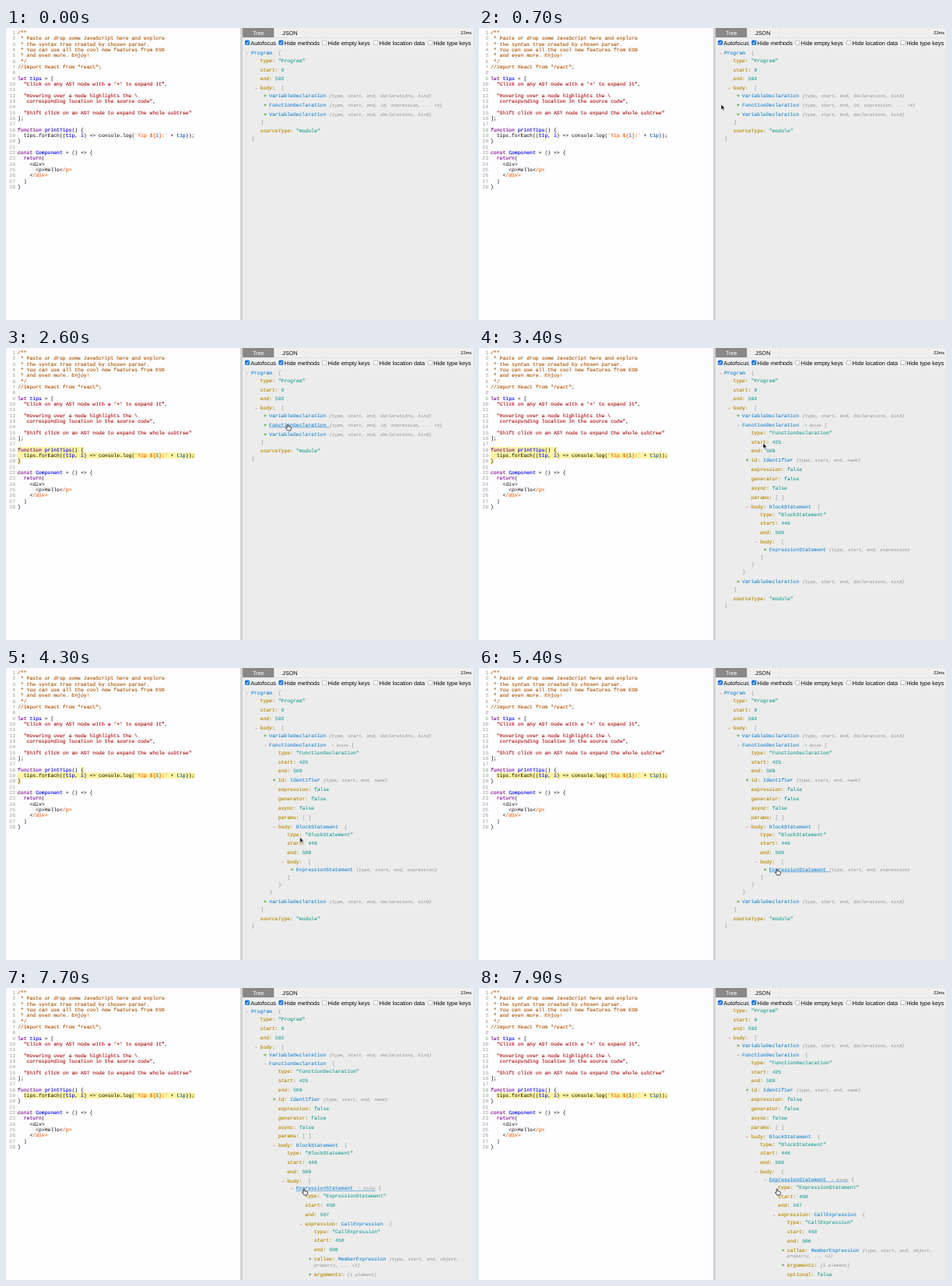
Animation, 600 px wide and 375 px high, one loop 8 s. Source, as an HTML page:

```html
<!DOCTYPE html>
<html lang="en">
<head>
<meta charset="utf-8">
<title>Syntax tree explorer</title>
<style>
html, body { margin: 0; width: 100%; height: 100%; overflow: hidden; background: #fefdff; }
svg { display: block; width: 600px; height: 375px; }
text { white-space: pre; text-rendering: geometricPrecision; stroke: none; }
.mono text { font: 6.43px "Liberation Mono", "Courier New", monospace; }
.ui text { font: 7.33px "Liberation Sans", Arial, sans-serif; }
#code text, #tree text { stroke-width: .12px; }
.num { fill: #999; text-anchor: end; }
.c { fill: #a50; stroke: #a50; } .s { fill: #a11; stroke: #a11; }
.k { fill: #708; stroke: #708; } .d { fill: #00f; stroke: #00f; }
.v { fill: #05a; stroke: #05a; } .t { fill: #f50; stroke: #f50; }
.key { fill: #b58900; stroke: #b58900; } .val { fill: #2aa198; stroke: #2aa198; }
.name { fill: #268bd2; stroke: #268bd2; } .p { fill: #8a9393; }
.hint { fill: #8f8f8f; font-size: .9em; font-style: italic; }
.ref { fill: #8f9799; font-size: .8em; font-style: italic; }
.plus { fill: #3a9a2a; stroke: #3a9a2a; } .minus { fill: #e0322f; stroke: #e0322f; }
</style>
</head>
<body>
<script type="text/plain" id="source">«c/**»
«c * Paste or drop some JavaScript here and explore»
«c * the syntax tree created by chosen parser.»
«c * You can use all the cool new features from ES6»
«c * and even more. Enjoy!»
«c */»
«c//import React from "react";»

«klet» «dtips» = [
  «s"Click on any AST node with a '+' to expand it"»,

  «s"Hovering over a node highlights the \»
«s   corresponding location in the source code"»,

  «s"Shift click on an AST node to expand the whole subtree"»
];

«kfunction» «dprintTips»() {
  tips.forEach((«dtip», «di») => console.log(«t`Tip ${»«vi»«t}:`» + «vtip»));
}

«kconst» «dComponent» = () => {
  «kreturn»(
    <div>
      <p>Hello<«t/p>»
    <«t/div>»
  )
}</script>
<svg viewBox="0 0 600 375">
  <rect width="600" height="375" fill="#fefdff"/>
  <g id="marks" fill="#fdf4a3"></g>
  <g id="code" class="mono"></g>
  <rect x="301" width="299" height="375" fill="#ececec"/>
  <g id="tree" class="mono"></g>
  <g id="header" class="ui"></g>
  <rect x="301" width="3" height="375" fill="#d2d2d2"/>
  <g id="cursor" stroke-linejoin="round">
    <path id="arrow" d="M0 0V7.2L1.7 5.7L2.9 8.4L4.1 7.9L2.9 5.3H5.2Z" fill="#111" stroke="#fff" stroke-width=".6"/>
    <path id="hand" d="M-.9 .6Q0 -.6 .8 .6V3Q1.7 2.4 2.2 3.2Q3.1 2.8 3.5 3.6Q4.5 3.4 4.5 4.5Q4.5 6.6 3.6 8H-.1Q-1.1 6.6 -2.5 4.8Q-2 3.7 -.9 4.7Z" fill="#fff" stroke="#111" stroke-width=".8"/>
  </g>
</svg>
<script>
const LOOP = 8000, CHAR = 3.858, LINE = 7.333, LEFT = 15;
const OPEN_FUNCTION = 2800, OPEN_STATEMENT = 7200, SCROLL_START = 7600, SCROLL_END = 7900;
const $ = id => document.getElementById(id);
const esc = s => s.replace(/&/g, '&amp;').replace(/</g, '&lt;');
const span = (cls, s) => `<tspan class="${cls}">${esc(s)}</tspan>`;
const text = (x, y, body, attrs = '') => `<text x="${x}" y="${y}" ${attrs}>${body}</text>`;
const rect = (x, y, w, h, fill, attrs = '') =>
  `<rect x="${x}" y="${y}" width="${w}" height="${h}" fill="${fill}" ${attrs}/>`;

// Editor
const lines = $('source').textContent.split('\n');
const lengths = lines.map(s => s.replace(/«.|»/g, '').length);
$('code').innerHTML = lines.map((s, i) => {
  const y = 8 + i * LINE;
  const body = esc(s).replace(/«(.)(.*?)»/g, '<tspan class="$1">$2</tspan>');
  return text(12, y, i + 1, 'class="num"') + text(LEFT, y, body, 'stroke="#000"');
}).join('');

function drawMarks(range) {
  if (!range) return '';
  const [from, startCol, to, endCol] = range;
  let out = '';
  for (let n = from; n <= to; n++) {
    const a = n === from ? startCol : 0;
    const b = n === to && endCol ? endCol : lengths[n - 1];
    out += rect(LEFT + a * CHAR, 2.4 + (n - 1) * LINE, (b - a) * CHAR, LINE + .1, '#fdf4a3');
  }
  return out;
}

// Panel header
const tab = (x, label, fill, color) =>
  rect(x, 0, 40.5, 12, fill) + text(x + 20.3, 8.6, label, `fill="${color}" text-anchor="middle"`);
const option = (x, label, on) =>
  (on ? rect(x, 15.8, 6, 6, '#1070e0', 'rx="1.2"') +
        `<path d="M${x + 1.4} 19l1.2 1.4l2-3.2" fill="none" stroke="#fff" stroke-width=".9"/>`
      : rect(x + .2, 16, 5.6, 5.6, '#fff', 'rx="1.1" stroke="#858585" stroke-width=".5"')) +
  text(x + 7.3, 21.6, label);
$('header').innerHTML =
  rect(304, 0, 296, 26, '#efefef') +
  tab(304, 'Tree', '#888', '#fff') + tab(344.5, 'JSON', '#efefef', '#111') +
  rect(385, 0, .5, 12, '#ddd') + rect(304, 12, 296, .6, '#dcdcdc') +
  text(598, 8, '22ms', 'text-anchor="end" style="font-size:5.6px"') +
  option(307, 'Autofocus', true) + option(350.3, 'Hide methods', true) +
  option(406.3, 'Hide empty keys') + option(472.2, 'Hide location data') +
  option(542, 'Hide type keys');

// Tree model
const prop = (key, val) => ({ key, val });
const base = (type, start, end) => [prop('type', `"${type}"`), prop('start', start), prop('end', end)];
const node = (key, name, range, hint, kids, ref) => ({ key, name, range, hint, kids, ref, brackets: '{}' });
const list = (key, kids, hint) => ({ key, kids, hint, brackets: '[]' });

function buildTree(functionOpen, statementOpen) {
  const declHint = '{type, start, end, declarations, kind}';
  const call = () => node('expression', 'CallExpression', [19, 2, 19, 59], '', [
    ...base('CallExpression', 450, 506),
    node('callee', 'MemberExpression', [19, 2, 19, 14], '{type, start, end, object,\nproperty, ... +2}'),
    list('arguments', null, '[1 element]'),
    prop('optional', 'false')
  ]);
  const statement = node('', 'ExpressionStatement', [19, 2, 19, 0], '{type, start, end, expression}',
    statementOpen && [...base('ExpressionStatement', 450, 507), call()], statementOpen);
  const func = node('', 'FunctionDeclaration', [18, 0, 20, 0], '{type, start, end, id, expression, ... +4}',
    functionOpen && [
      ...base('FunctionDeclaration', 425, 509),
      node('id', 'Identifier', [18, 9, 18, 18], '{type, start, end, name}'),
      prop('expression', 'false'), prop('generator', 'false'), prop('async', 'false'),
      { key: 'params', empty: '[ ]' },
      node('body', 'BlockStatement', [18, 21, 20, 0], '', [
        ...base('BlockStatement', 446, 509), list('body', [statement])
      ])
    ], functionOpen && !statementOpen);
  return node('', 'Program', [1, 0, 28, 0], '', [
    ...base('Program', 0, 592),
    list('body', [
      node('', 'VariableDeclaration', [9, 0, 16, 0], declHint), func,
      node('', 'VariableDeclaration', [22, 0, 28, 0], declHint)
    ]),
    prop('sourceType', '"module"')
  ]);
}

// Flat rows with positions; each row knows where its closing bracket sits
function layout(root) {
  const rows = [];
  const place = (n, depth, y) => {
    const row = { n, x: 315 + 11.55 * depth, y, end: y };
    rows.push(row);
    if (n.kids) {
      let next = y + 9.7;
      for (const kid of n.kids) row.end = place(kid, depth + 1, next), next = row.end + 11.9;
      row.end += 9.7;
    } else if (n.hint && n.hint.includes('\n')) row.end += 7.6;
    return row.end;
  };
  place(root, 0, 31.9);
  return rows;
}

const hit = (rows, px, py) => rows.filter(({ n, x, y, end }) =>
  n.range && px >= x - 3 && py >= y - 5 && py <= end + 5).pop();

function drawRow({ n, x, y, end }, hovered) {
  const by = y + 2;
  let body = n.key ? span('key', n.key + ':') + ' ' : '', out = '';
  if (n.brackets) {
    out += text(x - 7, by, n.kids ? '-' : '+', `class="${n.kids ? 'minus' : 'plus'}"`);
    if (n.name) body += span('name', n.name) + ' ';
    if (n.ref) body += span('ref', ' = $node');
    if (n.kids) body += span('p', (n.ref || !n.name && !n.key ? ' ' : ' ') + n.brackets[0]);
    else {
      const [first, rest] = n.hint.split('\n');
      body += span('hint', first);
      if (rest) out += text(x, by + 7.6, span('hint', rest));
    }
    if (n.kids) out += text(x + (n.name || n.key ? .4 : 0), end + 2, n.brackets[1], 'class="p"');
    if (hovered) {
      const chars = n.key ? n.key.length + 2 : 0;
      const width = (n.name.length + 1 + (n.ref ? 6.4 : 0)) * CHAR;
      out += rect(x + chars * CHAR, by + .7, width, .6, '#268bd2');
    }
  } else body += n.empty ? span('p', n.empty) : span('val', String(n.val));
  return out + text(x, by, body);
}

// Pointer path: time, x, y
const path = [
  [400, 225, 150], [700, 311, 98], [1200, 345, 87], [1500, 344, 98], [1800, 342, 108],
  [2100, 342, 108], [2500, 362, 98], [2900, 362, 98], [3300, 365, 122], [3600, 365, 122],
  [4700, 383, 258], [LOOP, 383, 258]
];
function pointer(t) {
  const i = path.findIndex(p => p[0] > t);
  if (i < 1) return null;
  const [t0, x0, y0] = path[i - 1], [t1, x1, y1] = path[i];
  const u = (t - t0) / (t1 - t0), e = u * u * (3 - 2 * u);
  return [x0 + (x1 - x0) * e, y0 + (y1 - y0) * e];
}

const trees = [[false, false], [true, false], [true, true]].map(s => layout(buildTree(...s)));
let lastKey;

function frame(now) {
  const t = now % LOOP;
  const stage = (t >= OPEN_FUNCTION) + (t >= OPEN_STATEMENT);
  const rows = trees[stage], at = pointer(t);
  const over = at && hit(rows, ...at);
  const onName = over && Math.abs(at[1] - over.y) < 5;
  const key = [stage, rows.indexOf(over), onName].join();
  if (key !== lastKey) {
    lastKey = key;
    $('tree').innerHTML = rows.map(r => drawRow(r, onName && r === over)).join('');
    $('marks').innerHTML = drawMarks(over && over.n.range);
  }
  const u = Math.min(1, Math.max(0, (t - SCROLL_START) / (SCROLL_END - SCROLL_START)));
  $('tree').setAttribute('transform', `translate(0 ${-13 * u * u})`);
  $('cursor').style.display = at ? '' : 'none';
  if (at) $('cursor').setAttribute('transform', `translate(${at})`);
  $('hand').style.display = onName ? '' : 'none';
  $('arrow').style.display = onName ? 'none' : '';
  requestAnimationFrame(frame);
}
requestAnimationFrame(frame);
</script>
</body>
</html>
```
